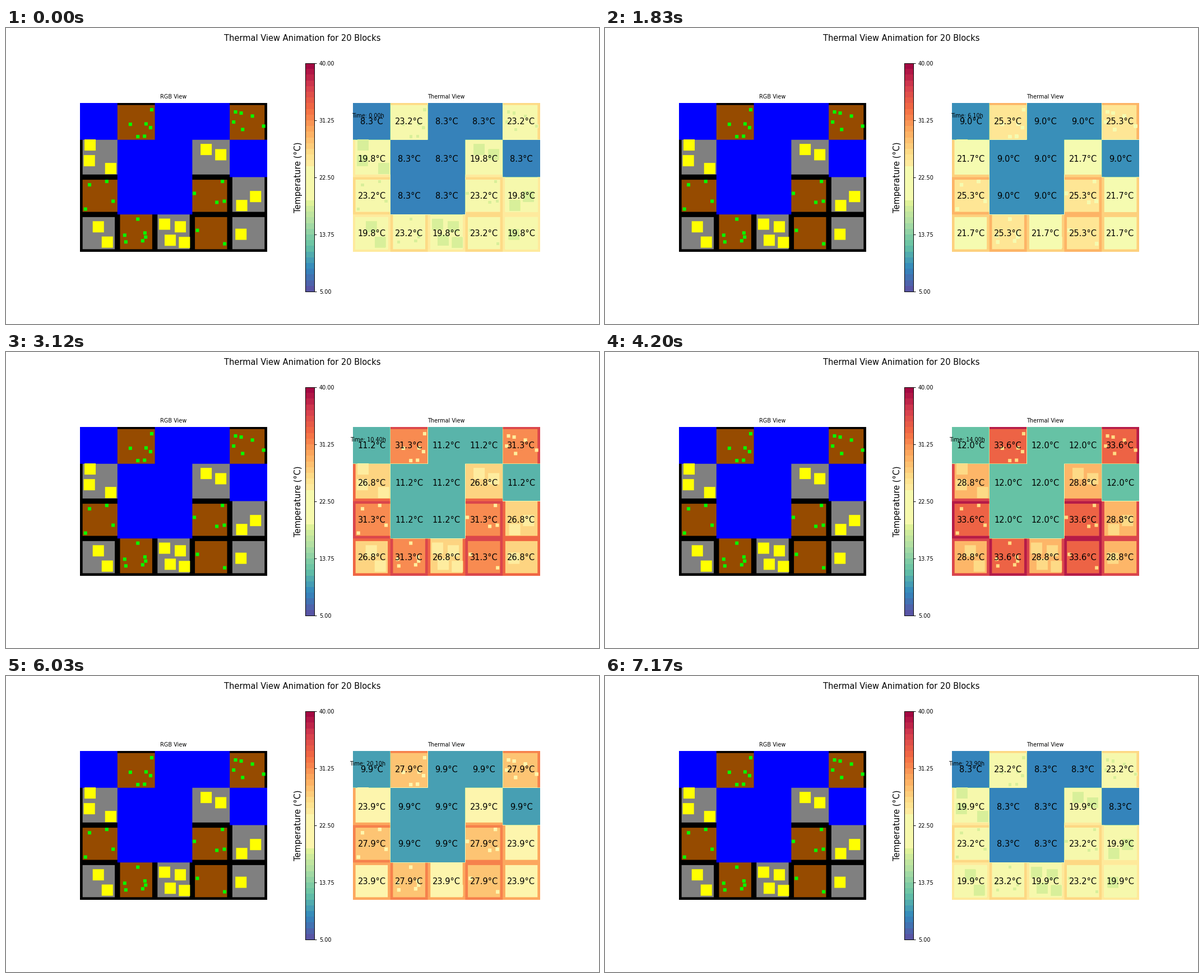
These frames come from a looping animation (1058x529 px, 7.2 s). A matplotlib script:

```python
import numpy as np
import matplotlib.pyplot as plt
from matplotlib.animation import FuncAnimation
from matplotlib.colors import ListedColormap, Normalize

W, H, DPI = 1058, 529, 88
FRAMES, INTERVAL = 240, 30
N = 100          # samples per block side
EDGE = 7         # road width in samples
LAYOUT = ["WBWWB", "GWWGW", "BWWBG", "GBGBG"]
ROWS, COLS = len(LAYOUT), len(LAYOUT[0])
LOW, HIGH = 5, 40

COLOR = {"W": (0, 0, 255), "B": (150, 75, 0), "G": (128, 128, 128)}
TEMP = {"W": 10, "B": 28, "G": 24}
ROAD_TEMP = {"B": 32, "G": 30}
PATCH_TEMP = 22

# Patch centres in stage pixels
PLANTS = [
    (260, 147), (222, 173), (250, 172), (258, 179), (235, 195), (247, 194),
    (409, 151), (419, 153), (439, 158), (406, 169), (422, 182), (459, 176),
    (180, 275), (149, 281), (191, 310), (142, 324),
    (386, 275), (336, 296), (389, 310), (376, 312),
    (235, 342), (212, 371), (248, 367), (249, 374), (244, 381), (214, 383),
    (341, 362), (390, 386),
]
HOUSES = [
    (150, 210), (149, 238), (187, 252), (357, 218), (383, 227),
    (445, 302), (420, 318), (165, 356), (181, 383),
    (283, 351), (311, 356), (293, 380), (318, 384), (419, 369),
]

SIDE = 333.3                       # view width in pixels
LEFT, RIGHT = 132.25, 618.9        # left edges of the two views
TOP = 133.8
VIEW_H = SIDE * ROWS / COLS


def is_water(r, c):
    return 0 <= r < ROWS and 0 <= c < COLS and LAYOUT[r][c] == "W"


def build_scene():
    rgb = np.zeros((ROWS * N, COLS * N, 3), np.uint8)
    heat = np.zeros((ROWS * N, COLS * N))
    for r, line in enumerate(LAYOUT):
        for c, kind in enumerate(line):
            y0, x0 = r * N, c * N
            y1, x1 = y0 + N, x0 + N
            if kind != "W":
                heat[y0:y1, x0:x1] = ROAD_TEMP[kind]
                # Roads run along every side that does not touch water
                y0 += 0 if is_water(r - 1, c) else EDGE
                y1 -= 0 if is_water(r + 1, c) else EDGE
                x0 += 0 if is_water(r, c - 1) else EDGE
                x1 -= 0 if is_water(r, c + 1) else EDGE
            rgb[y0:y1, x0:x1] = COLOR[kind]
            heat[y0:y1, x0:x1] = TEMP[kind]

    def stamp(points, size, color):
        k = COLS * N / SIDE
        for x, y in points:
            i = max(0, round((y - TOP) * k - size / 2))
            j = max(0, round((x - LEFT) * k - size / 2))
            rgb[i:i + size, j:j + size] = color
            heat[i:i + size, j:j + size] = PATCH_TEMP

    stamp(PLANTS, 9, (0, 255, 0))
    stamp(HOUSES, 30, (255, 255, 0))
    return rgb, heat


rgb, heat = build_scene()
kinds, counts = np.unique(heat, return_counts=True)

norm = Normalize(LOW, HIGH)
spectral = plt.get_cmap("Spectral_r")
full = spectral(np.arange(256))
bands = spectral((np.arange(40) + 0.5) / 40)
PALE = (0.40, 0.55)                # range shown as one pale tone
pale_full = slice(102, 141)
pale_bands = slice(16, 22)


def day_factor(hour):
    return 1 + 0.2 * np.cos(2 * np.pi * (hour - 14) / 24)


def pale_tone(factor):
    v = norm(kinds * factor)
    inside = (v >= PALE[0]) & (v < PALE[1])
    colors = np.vstack([spectral(np.asarray(v)[inside]), bands[pale_bands]])
    weights = np.concatenate([counts[inside], np.full(6, 366)])
    return np.average(colors, axis=0, weights=weights)


fig = plt.figure(figsize=(W / DPI, H / DPI), dpi=DPI, facecolor="white")
fig.suptitle("Thermal View Animation for 20 Blocks", fontsize=12)


def add_view(x, title):
    ax = fig.add_axes([x / W, 1 - (TOP + VIEW_H) / H, SIDE / W, VIEW_H / H])
    ax.set_title(title, fontsize=8)
    ax.axis("off")
    return ax


rgb_ax = add_view(LEFT, "RGB View")
rgb_ax.imshow(rgb, aspect="auto")
heat_ax = add_view(RIGHT, "Thermal View")
heat_img = heat_ax.imshow(heat, cmap=spectral, norm=norm, aspect="auto")

cax = fig.add_axes([0.505, 0.11, 0.015, 0.77])
bar = cax.imshow(bands[:, None], origin="lower", aspect="auto",
                 extent=(0, 1, LOW, HIGH), interpolation="nearest")
ticks = np.linspace(LOW, HIGH, 5)
cax.set_xticks([])
cax.set_yticks(ticks, [f"{t:.2f}" for t in ticks], fontsize=8)
cax.yaxis.tick_right()
cax.yaxis.set_label_position("left")
cax.set_ylabel("Temperature (°C)", fontsize=12)

labels = []
for r, line in enumerate(LAYOUT):
    for c, kind in enumerate(line):
        text = heat_ax.text((c + 0.5) * N, (r + 0.5) * N, "", fontsize=12,
                            ha="center", va="center")
        labels.append((text, TEMP[kind]))
clock = heat_ax.text(0.08, 0.9, "", transform=heat_ax.transAxes,
                     fontsize=8, ha="center")


def update(frame):
    hour = frame * 0.1
    factor = day_factor(hour)
    tone = pale_tone(factor)

    tones = full.copy()
    tones[pale_full] = tone
    heat_img.set_cmap(ListedColormap(tones))
    heat_img.set_data(heat * factor)

    strip = bands.copy()
    strip[pale_bands] = tone
    bar.set_data(strip[:, None])

    for text, base in labels:
        text.set_text(f"{base * factor:.1f}°C")
    clock.set_text(f"Time: {hour:.2f}h")
    return []


anim = FuncAnimation(fig, update, frames=FRAMES, interval=INTERVAL,
                     init_func=lambda: update(0), repeat=True, repeat_delay=0)
plt.show()
```
